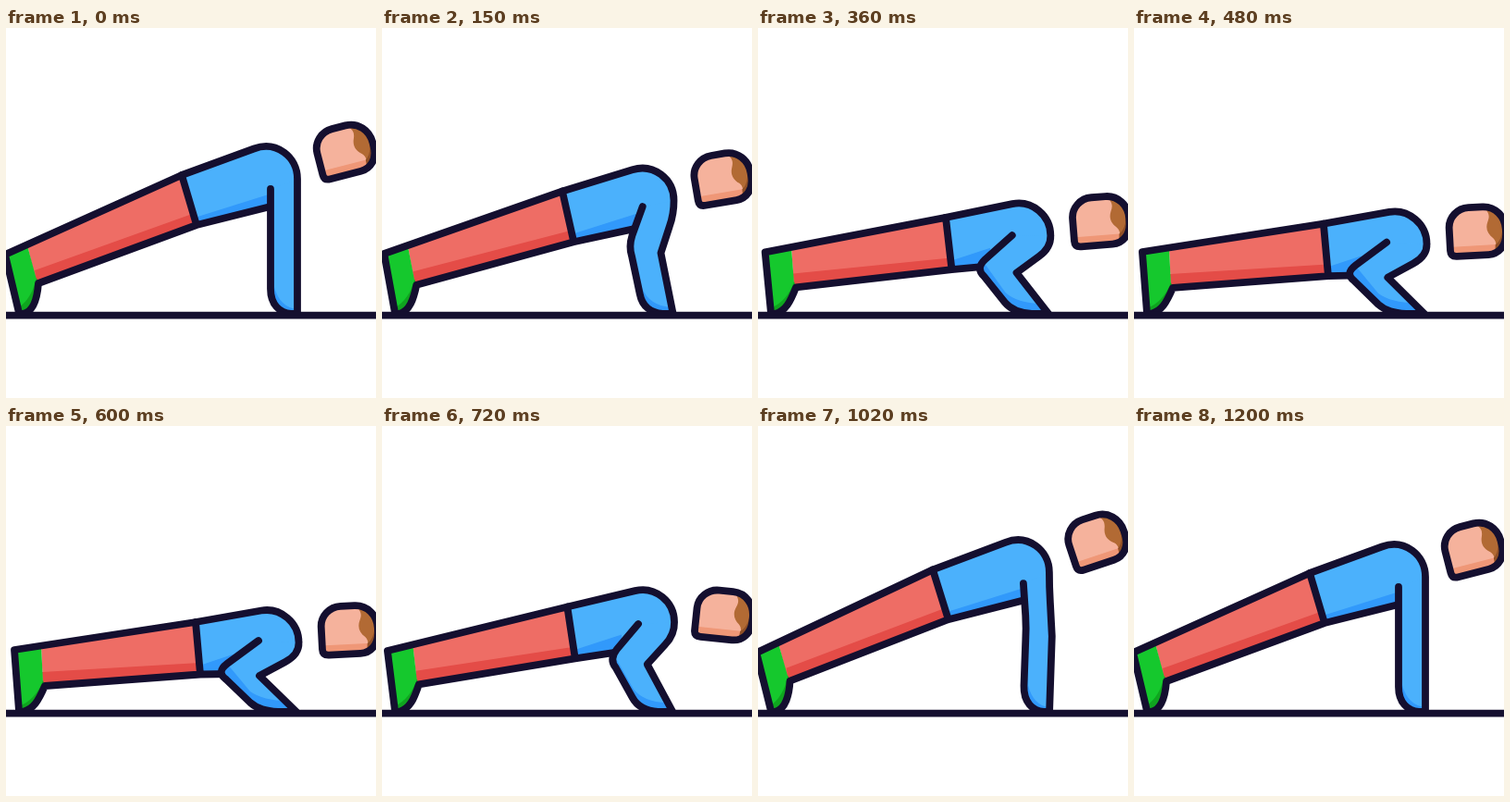
An HTML page that plays this animation: 400x400 px, repeating every 3230 ms.

```html
<!DOCTYPE html>
<html lang="en">
<head>
<meta charset="utf-8">
<title>Push-up</title>
<style>
  html, body { margin: 0; width: 100%; height: 100%; overflow: hidden; background: #fff; }
  svg { display: block; width: 100%; height: 100%; }
  .line { fill: none; stroke: #140f2f; stroke-width: 7.8; stroke-linecap: round; stroke-linejoin: round; }
</style>
</head>
<body>
<svg viewBox="0 0 400 400">
  <defs>
    <clipPath id="skull"><path d="M-29 18Q-29 24.5 -22 24.5H12C23 24.5 32 16 32 2V-2C32 -16 22 -27.5 8 -27.5H-7C-19 -27.5 -29 -18 -29 -6Z"/></clipPath>
  </defs>
  <g id="body"></g>
  <path class="line" d="M-10 310.6H410"/>
  <g id="head">
    <g clip-path="url(#skull)">
      <rect x="-32" y="-32" width="70" height="60" fill="#f5b29c"/>
      <rect x="-32" y="14" width="70" height="14" fill="#ef9777"/>
      <path fill="#b26a34" d="M8 -28C16 -21 15.500 -17 13 -11C10 -4 12 2 18 7C22 11 21 17 19 25H36V-28Z"/>
      <path fill="#8f4f26" d="M19 25L20 14C25 11 28 5 29 -6H36V25Z"/>
    </g>
    <path class="line" d="M-29 18Q-29 24.5 -22 24.5H12C23 24.5 32 16 32 2V-2C32 -16 22 -27.5 8 -27.5H-7C-19 -27.5 -29 -18 -29 -6Z"/>
  </g>
</svg>
<script>
const LOOP = 3230, STEP = 30;

// Each part: fill (null for an outline), path with arms straight, path when lowered.
const parts = [
  ['#4bb1fc',
    'M190 159L268 130.5C292 121.5 315 139 315 163L300 189.5L206 213Z',
    'M205 212L276 199.5C297 196 316.5 212.5 316.5 234L242 268L210 268.5Z'],
  ['#3199fb',
    'M204 205L290 178L300 189.5L206 213Z',
    'M209 259L245 247L242 268L210 268.5Z'],
  ['#ee6d65',
    'M23 235L190 159L206 213L33 276Z',
    'M38 237L205 212L210 268.5L40 281Z'],
  ['#e44c47',
    'M31 262L204 200L206 213L33 276Z',
    'M39 266L209 256L210 268.5L40 281Z'],
  ['#15c82d',
    'M-1 245L23 235L33 272L35 276C34 290 30 307 18 309L14 308Z',
    'M9 242L38 237L40 277L42 281C35 297 30 306 18 309L14 308Z'],
  ['#0fa51f',
    'M33 270Q28 292 14 302L14 308L18 309C30 307 34 290 35 276Z',
    'M40 275Q32 296 14 303L14 308L18 309C30 306 35 297 42 281Z'],
  [null,
    'M190 159L-1 245L14 308L18 309C30 307 34 290 35 276L206 213L300 189.5M190 159L206 213',
    'M205 212L9 242L14 308L18 309C30 306 35 297 42 281L210 268.5L242 268M205 212L210 268.5'],
  ['#4bb1fc',
    'M286 174L286 208Q286 222 286 234L286 282C286 299 296 308 308 309L315 309L315 230L315 195Q315 178 315 163Z',
    'M273 232L239 257Q227 266 238 274L264 299C272 306 281 308 294 309L314 309L274 270L302 255Q317 247 316.5 234Z'],
  ['#3199fb',
    'M288 246L290 280Q296 302 315 304L315 309L308 309C296 308 286 299 286 282L286 234Q286 228 288 246Z',
    'M239 257L264 287Q278 297 304 297L314 309L294 309C281 308 272 306 264 299L238 274Q228 266 239 257Z'],
  [null,
    'M286 174L286 208Q286 222 286 234L286 282C286 299 296 308 308 309L315 309L315 230L315 195Q315 178 315 163C315 139 292 121.5 268 130.5L190 159',
    'M273 232L239 257Q227 266 238 274L264 299C272 306 281 308 294 309L314 309L274 270L302 255Q317 247 316.5 234C316.5 212.5 297 196 276 199.5L205 212']
];

// [time, value]
const depthKeys = [[0, 0], [150, .33], [360, .865], [600, 1], [720, .69],
  [870, .085], [960, -.07], [1080, -.04], [1200, 0]];
const nodKeys = [[0, 0], [150, 1], [360, 0], [540, 0], [600, 0], [720, 12.5],
  [870, -1], [960, -4], [1080, -1.5], [1200, 0]];

// Smooth curve through the keys, at rest at both ends.
function curve(keys, t) {
  const last = keys.length - 1;
  if (t >= keys[last][0]) return keys[last][1];
  const i = keys.findIndex((k, n) => n < last && t < keys[n + 1][0]);
  const slope = n => n === 0 || n === last ? 0 :
    (keys[n + 1][1] - keys[n - 1][1]) / (keys[n + 1][0] - keys[n - 1][0]);
  const [t0, a] = keys[i], [t1, b] = keys[i + 1];
  const d = t1 - t0, u = (t - t0) / d, v = 1 - u;
  return a * v * v * (1 + 2 * u) + b * u * u * (3 - 2 * u) +
    d * u * v * (slope(i) * v - slope(i + 1) * u);
}

const mix = (a, b, p) => a + (b - a) * p;
const number = /-?\d+(\.\d+)?/g;

function morph(up, down, p) {
  const ends = down.match(number);
  let i = 0;
  return up.replace(number, n => mix(+n, +ends[i++], p).toFixed(2));
}

const body = document.getElementById('body');
const head = document.getElementById('head');
const paths = parts.map(([fill]) => {
  const path = document.createElementNS('http://www.w3.org/2000/svg', 'path');
  if (fill) path.setAttribute('fill', fill);
  else path.setAttribute('class', 'line');
  return body.appendChild(path);
});

function draw(t) {
  const p = curve(depthKeys, t), nod = curve(nodKeys, t);
  parts.forEach(([, up, down], i) => paths[i].setAttribute('d', morph(up, down, p)));
  const x = mix(366, 370, p), y = mix(134, 222, p) + nod * .88;
  head.setAttribute('transform', `translate(${x} ${y}) rotate(${mix(-14.5, -3, p) + nod})`);
}

const start = performance.now();
function tick() {
  const t = (performance.now() - start) % LOOP;
  draw(Math.floor(t / STEP) * STEP);
  requestAnimationFrame(tick);
}
tick();
</script>
</body>
</html>
```
